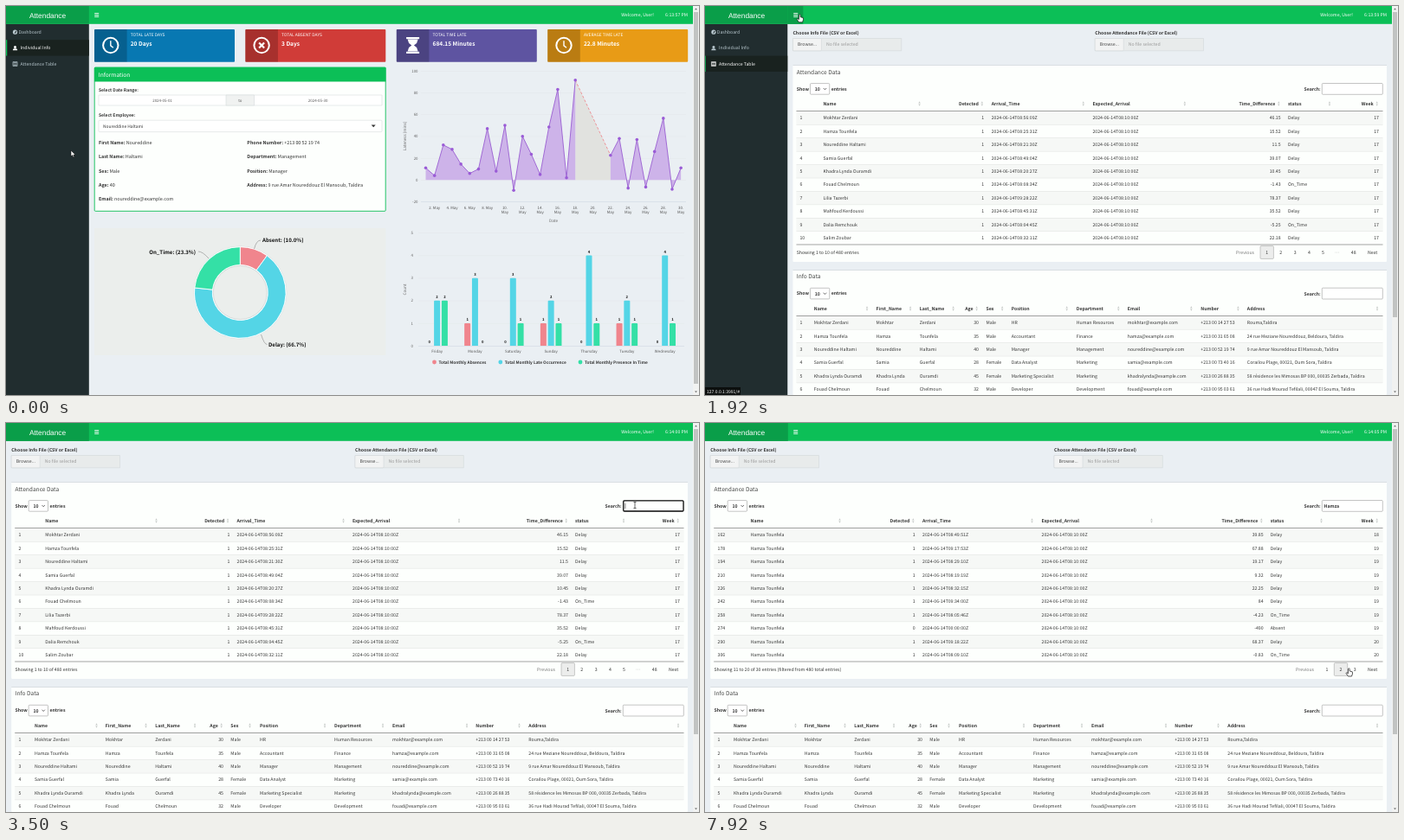
An HTML page with a canvas for the animation above (8000 ms loop, 800x450 px).

```html
<!DOCTYPE html>
<html lang="en">
<head>
<meta charset="utf-8">
<title>Attendance</title>
<style>
html, body { margin: 0; width: 100%; height: 100%; overflow: hidden; }
canvas { display: block; }
</style>
</head>
<body>
<canvas id="stage" width="800" height="450"></canvas>
<script>
const ctx = document.getElementById('stage').getContext('2d');
ctx.textRendering = 'geometricPrecision';
const SANS = '"Noto Sans CJK JP", "Noto Sans CJK SC", "Noto Sans CJK", Lato, sans-serif';
const LOOP = 8000, GREEN = '#0cbf57', DARK_GREEN = '#0a9e49', PAGE = '#eaeff3', PANEL = '#fdfffd';
const TICKS = [900, 1900, 2900, 3980, 4980, 5810, 6900, 7900];
const KEYS = [3670, 4580, 5580, 5660, 5760];
const QUERY = 'Hamza', FILTER_AT = 4750, PAGE2_AT = 7500;

// Drawing helpers; text is centred vertically on y
function text(s, x, y, color = '#333', size = 5.2, weight = 400, align = 'left', font = SANS) {
  ctx.font = `${weight} ${size}px ${font}`;
  ctx.textAlign = align;
  ctx.fillStyle = color;
  ctx.fillText(s, x, y + size * 0.365);
}
const bold = (s, x, y, color, size, align) => text(s, x, y, color, size, 700, align);
function rect(x, y, w, h, color) {
  ctx.fillStyle = color;
  ctx.fillRect(x, y, w, h);
}
function box(x, y, w, h, fill, stroke, r = 0, line = 0.5) {
  ctx.beginPath();
  ctx.roundRect(x, y, w, h, r);
  paint(fill, stroke, line);
}
function circle(x, y, r, fill, stroke, line) {
  ctx.beginPath();
  ctx.arc(x, y, r, 0, 7);
  paint(fill, stroke, line);
}
function poly(points, fill, stroke, line, close = true) {
  ctx.beginPath();
  points.forEach(p => ctx.lineTo(...p));
  if (close) ctx.closePath();
  paint(fill, stroke, line);
}
function paint(fill, stroke, line = 0.5) {
  if (fill) { ctx.fillStyle = fill; ctx.fill(); }
  if (stroke) { ctx.strokeStyle = stroke; ctx.lineWidth = line; ctx.stroke(); }
}
const lerp = (a, b, k) => a + (b - a) * k;
const ease = k => k * k * (3 - 2 * k);
const clamp = k => Math.max(0, Math.min(1, k));

// Data
const people = [
  ['Mokhtar', 'Zerdani', 30, 'Male', 'HR', 'Human Resources', '+213 00 14 27 53', 'Rouma,Taldira'],
  ['Hamza', 'Tounfela', 35, 'Male', 'Accountant', 'Finance', '+213 00 31 65 08', '24 rue Meziane Noureddouz, Beldoura, Taldira'],
  ['Noureddine', 'Haltami', 40, 'Male', 'Manager', 'Management', '+213 00 52 19 74', '9 rue Amar Noureddouz El Mansoub, Taldira'],
  ['Samia', 'Guerfal', 28, 'Female', 'Data Analyst', 'Marketing', '+213 00 73 40 16', 'Corailou Plage, 00021, Oum Sora, Taldira'],
  ['Khadra Lynda', 'Ouramdi', 45, 'Female', 'Marketing Specialist', 'Marketing', '+213 00 26 88 35', '58 résidence les Mimosas BP 000, 00035 Zerbada, Taldira'],
  ['Fouad', 'Chelmoun', 32, 'Male', 'Developer', 'Development', '+213 00 95 03 61', '36 rue Hadi Mourad Tefilali, 00047 El Souma, Taldira'],
];
const fullName = p => p[0] + ' ' + p[1];
const email = p => p[0].toLowerCase().replace(' ', '') + '@example.com';
const staff = [...people.map(fullName), 'Lilia Tazerbi', 'Mahfoud Kerdoussi', 'Dalia Remchouk', 'Salim Zoubar'];

function entry(id, name, time) {
  const [h, m, s] = time.split(':').map(Number);
  const late = +(h * 60 + m + s / 60 - 490).toFixed(2);
  const status = !h ? 'Absent' : late > 0 ? 'Delay' : 'On_Time';
  const week = 17 + Math.floor((Math.floor((id - 1) / 16) + 3) / 7);
  return [id, name, h ? 1 : 0, `2024-06-14T${time}Z`, '2024-06-14T08:10:00Z', late, status, week];
}
const everyone = '08:56:09 08:25:31 08:21:30 08:49:04 08:20:27 08:08:34 09:28:22 08:45:31 08:04:45 08:32:11'
  .split(' ').map((s, i) => entry(i + 1, staff[i], s));
const filtered = ('08:25:31 08:42:30 09:29:35 08:59:28 08:06:54 08:05:17 08:31:31 00:00:00 00:00:00 08:20:22 ' +
  '08:49:51 09:17:53 08:29:10 08:19:19 08:32:15 09:34:00 08:05:46 00:00:00 09:18:22 08:09:10')
  .split(' ').map((s, i) => entry(2 + 16 * i, staff[1], s));
const infoRows = people.map((p, i) =>
  [i + 1, fullName(p), p[0], p[1], p[2], p[3], p[4], p[5], email(p), p[6], p[7]]);

// Columns: title, x per layout (sidebar open, closed, filtered), sort icon x or 'r' for right-aligned
const mainCols = [
  ['', [110, 14.5, 14.5]],
  ['Name', [137, 45.3, 52.5], [248, 173.5, 155.5]],
  ['Detected', [322.5, 258.3, 242.6], 'r'],
  ['Arrival_Time', [331, 266.5, 251], [437, 389.5, 377.5]],
  ['Expected_Arrival', [447.7, 400, 388.5], [554, 523, 515.5]],
  ['Time_Difference', [664.7, 649, 644.6], 'r'],
  ['status', [673, 657, 652.7], [721, 713, 711.5]],
  ['Week', [778, 778, 778], 'r'],
];
const infoCols = [
  ['', [110, 14.5]],
  ['Name', [126.3, 33], [187.5, 104.5]],
  ['First_Name', [198, 114.8], [237.5, 161.5]],
  ['Last_Name', [248.2, 172.2], [287, 218]],
  ['Age', [316.3, 251], 'r'],
  ['Sex', [324.8, 259.3], [343.5, 281.5]],
  ['Position', [354, 293], [418, 368]],
  ['Department', [429, 379], [477.5, 435]],
  ['Email', [488, 446], [561.5, 532]],
  ['Number', [572.5, 542.3], [615.5, 592.5]],
  ['Address', [626, 603.3], [776, 776]],
];

function table(cols, rows, headY, firstY, left, place) {
  const step = 15.43;
  rows.forEach((row, i) => {
    const y = firstY + i * step;
    if (i % 2 == 0) rect(left, y, 782.5 - left, step, '#f6f8f6');
    if (i) rect(left, y, 782.5 - left, 0.5, '#dcdedc');
  });
  rect(left, firstY - 0.5, 782.5 - left, 0.6, '#666');
  if (rows.length == 10) rect(left, firstY + 10 * step - 0.2, 782.5 - left, 0.6, '#666');
  cols.forEach(([title, xs, icon], c) => {
    const x = place(xs), right = icon == 'r', align = right ? 'right' : 'left';
    bold(title, right ? x - 6.3 : x, headY, '#333', 5.2, align);
    if (icon) {
      const ix = right ? x - 2.3 : place(icon);
      poly([[ix - 1.2, headY - 0.6], [ix + 1.2, headY - 0.6], [ix, headY - 2.8]], '#c4c8c6');
      poly([[ix - 1.2, headY + 0.6], [ix + 1.2, headY + 0.6], [ix, headY + 2.8]], '#c4c8c6');
    }
    rows.forEach((row, i) => text(row[c], x, firstY + (i + 0.5) * step, '#333', 5.2, 400, align));
  });
}

function tableHead(title, x, y) {
  text(title, x + 4.3, y + 8, '#444', 6.6);
  bold('Show', x + 4.3, y + 27.5);
  box(x + 20, y + 21.3, 22.3, 12.6, '#fff', '#888', 1);
  bold('10', x + 25.2, y + 27.7);
  poly([[x + 35.3, y + 26.7], [x + 37, y + 28.5], [x + 38.7, y + 26.7]], null, '#333', 0.7, false);
  bold('entries', x + 44.3, y + 27.5);
  bold('Search:', 710.7, y + 27.7, '#333', 5.2, 'right');
  box(712.3, y + 21.2, 70, 12.8, '#fff', '#888', 1);
}

function fileInput(label, x) {
  bold(label, x, 31.3);
  box(x, 37.5, 125.3, 14.3, '#e8ebeb', '#cdd2d5');
  box(x, 37.5, 33, 14.3, '#f2f3f3', '#cdd2d5', 1);
  text('Browse...', x + 5.5, 44.6, '#444');
  text('No file selected', x + 38.5, 44.6, '#999');
}

function pager(labels, current) {
  for (const [s, x] of labels) {
    if (s == current) box(x - 7.7, 277.6, 15.4, 14.8, '#ecedec', '#999', 1);
    text(s, x, 285.2, s == 'Previous' || s == '…' ? '#777' : '#333', 5.2, 400, 'center');
  }
}

function tablePage(t, p) {
  const x = lerp(102, 6.2, p), isFiltered = t >= FILTER_AT, second = t >= PAGE2_AT;
  const slide = xs => lerp(xs[0], xs[1], p);
  fileInput('Choose Info File (CSV or Excel)', x);
  fileInput('Choose Attendance File (CSV or Excel)', lerp(450.5, 403, p));
  for (const [y, h] of [[68, 228], [305, 145]]) {
    box(x, y, 787 - x, h, PANEL, null, 1);
    rect(x, y, 787 - x, 1, '#d9dee2');
  }
  tableHead('Attendance Data', x, 68.3);
  const focus = t >= 3500 && !second;
  if (focus) box(712.8, 89.8, 69.2, 12.2, '#fff', '#111', 1.2, 1.3);
  const typed = QUERY.slice(0, KEYS.filter(k => t >= k).length);
  bold(typed, 714.5, 96);
  if (focus && t < 4000) rect(714.7 + ctx.measureText(typed).width, 93, 0.5, 6, '#111');
  const rows = isFiltered ? filtered.slice(second ? 10 : 0, second ? 20 : 10) : everyone;
  table(mainCols, rows, 113, 121.6, x + 4, isFiltered ? xs => xs[2] : slide);
  text(isFiltered ? `Showing ${second ? '11 to 20' : '1 to 10'} of 30 entries (filtered from 480 total entries)`
    : 'Showing 1 to 10 of 480 entries', x + 4.3, 285);
  pager(isFiltered
    ? [['Previous', 692.5], ['1', 718], ['2', 734], ['3', 750.3], ['Next', 770.6]]
    : [['Previous', 623.5], ['1', 648.7], ['2', 664.8], ['3', 681.2], ['4', 697.4], ['5', 713.5], ['…', 729.7], ['48', 748.7], ['Next', 770.6]],
    second ? '2' : '1');
  tableHead('Info Data', x, 305);
  table(infoCols, infoRows, 350, 358.5, x + 4, slide);
}

// Individual info page
function clockIcon(x, y) {
  circle(x, y, 8.7, null, '#fff', 2);
  poly([[x, y - 5.2], [x, y + 0.3], [x + 3, y + 2.8]], null, '#fff', 1.4, false);
}
function crossIcon(x, y) {
  circle(x, y, 8.7, null, '#fff', 2);
  poly([[x - 3, y - 3], [x + 3, y + 3]], null, '#fff', 2.2);
  poly([[x - 3, y + 3], [x + 3, y - 3]], null, '#fff', 2.2);
}
function hourglassIcon(x, y) {
  rect(x - 7.5, y - 9.5, 15, 2.2, '#fff');
  rect(x - 7.5, y + 7.3, 15, 2.2, '#fff');
  poly([[x - 6, y - 7], [x + 6, y - 7], [x + 4.5, y - 2.5], [x + 1.3, y], [x + 4.5, y + 2.5], [x + 6, y + 7],
    [x - 6, y + 7], [x - 4.5, y + 2.5], [x - 1.3, y], [x - 4.5, y - 2.5]], '#fff');
}
const cards = [
  [102, '#0878b2', 'TOTAL LATE DAYS', '20 Days', clockIcon],
  [276.3, '#d03c38', 'TOTAL ABSENT DAYS', '3 Days', crossIcon],
  [450.8, '#5e54a1', 'TOTAL TIME LATE', '684.15 Minutes', hourglassIcon],
  [625.2, '#e89b16', 'AVERAGE TIME LATE', '22.8 Minutes', clockIcon],
];

function infoPanel() {
  const p = people[2];
  box(102.2, 71, 336, 166.3, PANEL, GREEN, 1, 0.9);
  rect(102, 71, 336.4, 16.5, GREEN);
  text('Information', 106.7, 79.3, '#fff', 6.6);
  bold('Select Date Range:', 107, 96.7, '#333', 5);
  box(107, 103, 327, 12, '#fff', '#cfd4d6');
  box(254, 103, 32.5, 12, '#f0f2f1', '#cfd4d6');
  ['2024-05-01', 'to', '2024-05-30'].forEach((s, i) => text(s, 180.5 + 89.8 * i, 109.2, '#555', 4.4, 400, 'center'));
  bold('Select Employee:', 107, 125.7, '#333', 5);
  box(107, 132.2, 327, 13.4, '#fff', '#cfd4d6', 1);
  text(fullName(p), 112, 139, '#333', 4.9);
  poly([[421.7, 137.6], [426.7, 137.6], [424.2, 140.2]], '#333');
  const fields = [['First Name:', p[0]], ['Last Name:', p[1]], ['Sex:', p[3]], ['Age:', p[2]], ['Email:', email(p)],
    ['Phone Number:', p[6]], ['Department:', p[5]], ['Position:', p[4]], ['Address:', p[7]]];
  fields.forEach(([label, value], i) => {
    const x = i < 5 ? 107 : 278.3, y = 158.3 + (i % 5) * 16.15;
    bold(label, x, y, '#333', 5.4);
    text(value, x + ctx.measureText(label + ' ').width, y, '#333', 5.4);
  });
}

const lateness = [11, 4, 32, 28, 14.5, 6, 10, 47, 8, 50, -9.5, 40, 23.5, 5, 48.5, 83, 2, 91.5,
  null, null, null, 22.5, 38, -7.5, 37, -6.5, 26, 56.5, -8.5, 11];
function areaChart() {
  const X = i => 484.5 + i * 10.16, Y = v => 201.2 - v * 1.262;
  for (let v = -20; v <= 100; v += 20) {
    rect(479, Y(v), 306, 0.5, v + 20 ? '#e1e5e8' : '#c9d2de');
    text(v, 475.5, Y(v), '#666', 4.4, 400, 'right');
  }
  const points = lateness.map((v, i) => [X(i), Y(v)]);
  const gap = [points[17], points[21]];
  poly([...gap, [gap[1][0], Y(0)], [gap[0][0], Y(0)]], '#e1e2df');
  ctx.setLineDash([3, 2]);
  poly(gap, null, '#ef7f86', 0.8, false);
  ctx.setLineDash([]);
  for (const run of [points.slice(0, 18), points.slice(21)]) {
    poly([[run[0][0], Y(0)], ...run, [run.at(-1)[0], Y(0)]], '#cdb3e9');
    poly(run, null, '#9a5fd2', 0.9, false);
    run.forEach(q => circle(...q, 1.8, '#9a5bd6'));
  }
  for (let d = 2; d <= 30; d += 2) {
    const lines = d < 10 ? [d + '. May'] : [d + '.', 'May'];
    lines.forEach((s, i) => text(s, X(d - 1), 233 + i * 5.6, '#555', 4.4, 400, 'center'));
  }
  text('Date', 632, 248, '#666', 4.6, 400, 'center');
  sideTitle('Lateness (mins)', 460.5, 150.5);
}
function sideTitle(s, x, y) {
  ctx.save();
  ctx.translate(x, y);
  ctx.rotate(-Math.PI / 2);
  text(s, 0, 0, '#666', 4.6, 400, 'center');
  ctx.restore();
}

const PINK = '#f0858d', CYAN = '#54d5e6', MINT = '#34e0a6';
function donut() {
  const cx = 270.3, cy = 331.5;
  rect(102, 257, 336.3, 147, '#ebeeec');
  circle(cx, cy, 53.6, '#fff', '#ccd2d2', 0.5);
  let a = -Math.PI / 2;
  for (const [share, color] of [[0.1, PINK], [2 / 3, CYAN], [0.2333, MINT]]) {
    const b = a + share * Math.PI * 2;
    ctx.beginPath();
    ctx.arc(cx, cy, 52.8, a, b);
    ctx.arc(cx, cy, 32, b, a, true);
    ctx.closePath();
    paint(color, '#fff', 0.9);
    a = b;
  }
  circle(cx, cy, 31, '#ebeeec', '#c3c8c8', 0.6);
  for (const [x1, y1, x2, y2, x3, y3] of [[294, 271, 289, 271, 286.5, 281], [222, 284, 227, 284, 234, 292], [301.5, 391.5, 298, 391.5, 294.5, 380]]) {
    ctx.beginPath();
    ctx.moveTo(x1, y1);
    ctx.quadraticCurveTo(x2, y2, x3, y3);
    paint(null, '#777', 0.5);
  }
  bold('Absent: (10.0%)', 296, 271, '#111', 6.1);
  bold('On_Time: (23.3%)', 219, 284.3, '#111', 6.1, 'right');
  bold('Delay: (66.7%)', 303, 392, '#111', 6.1);
}

const week = { Friday: [0, 2, 2], Monday: [1, 3, 0], Saturday: [0, 3, 1], Sunday: [1, 2, 1], Thursday: [0, 4, 1], Tuesday: [1, 2, 1], Wednesday: [0, 4, 1] };
function barChart() {
  const Y = v => 393 - v * 26.1;
  for (let v = 0; v <= 5; v++) {
    rect(476, Y(v), 307, 0.5, v ? '#e1e5e8' : '#c9d2de');
    text(v, 470, Y(v), '#666', 4.4, 400, 'right');
  }
  Object.entries(week).forEach(([day, counts], d) => {
    const x = 497.6 + d * 43.85;
    text(day, x, 399, '#555', 4.4, 400, 'center');
    counts.forEach((n, i) => {
      const bx = x + (i - 1) * 8.8;
      box(bx - 3.5, Y(n), 7, n * 26.1, [PINK, CYAN, MINT][i], null, n ? [1, 1, 0, 0] : 0);
      bold(n, bx, Y(n) - 4.6, '#111', 4.2, 'center');
    });
  });
  sideTitle('Count', 460.5, 328);
  [[494.5, PINK, 'Total Monthly Absences'], [570.8, CYAN, 'Total Monthly Late Occurrence'], [663, MINT, 'Total Monthly Presence In Time']]
    .forEach(([x, color, s]) => {
      circle(x, 412, 2.4, color);
      bold(s, x + 5, 412, '#333', 4.75);
    });
}

function infoPage() {
  for (const [x, color, label, value, icon] of cards) {
    box(x, 27, 162, 37.7, color, null, 1);
    rect(x, 27, 37.6, 37.7, 'rgba(0,0,0,.2)');
    icon(x + 18.8, 45.5);
    text(label, x + 41.7, 33.6, '#fff', 4.9);
    bold(value, x + 41.7, 43.2, '#fff', 6.6);
  }
  infoPanel();
  areaChart();
  donut();
  barChart();
}

// Frame around the pages
function sidebar(x, active) {
  rect(x, 21, 95.8, 429, '#212d2f');
  rect(x, 39.2 + active * 18.4 - 18.4, 95.8, 18.4, '#19221f');
  rect(x, 39.2 + active * 18.4 - 18.4, 1.3, 18.4, GREEN);
  ['Dashboard', 'Individual Info', 'Attendance Table'].forEach((s, i) => {
    const y = 30.2 + i * 18.4, on = i == active, color = on ? '#fff' : '#b8c7ce';
    text(s, x + (i ? 16.6 : 14.4), y, color, 5.2, on ? 500 : 400);
    const ix = x + 10.5;
    if (i == 0) {
      circle(ix, y, 2.6, color);
      poly([[ix, y + 1.2], [ix + 1.2, y - 1.3]], null, '#212d2f', 0.8);
    } else if (i == 1) {
      circle(ix, y - 1.2, 1.5, color);
      box(ix - 2.6, y + 0.6, 5.2, 2, color, null, [1.5, 1.5, 0, 0]);
    } else {
      box(ix - 2.5, y - 2.4, 5, 4.9, null, color, 0, 0.7);
      for (let k = -1; k < 2; k++) rect(ix - 2, y + k * 1.4 - 0.3, 4, 0.7, color);
    }
  });
}

function header(t) {
  rect(0, 0, 793, 20.8, GREEN);
  rect(0, 0, 95.8, 20.8, DARK_GREEN);
  if (t > 1600 && t < 2300) rect(95.8, 0, 17.5, 20.8, DARK_GREEN);
  text('Attendance', 48, 10.5, '#fff', 8.33, 400, 'center', '"Liberation Sans", Arial, sans-serif');
  for (let i = 0; i < 3; i++) rect(102.2, 8.1 + i * 1.9, 5, 0.9, '#fff');
  text('Welcome, User!', 710.3, 10.5, '#fff');
  const s = 57 + TICKS.filter(k => t >= k).length;
  text(`6:${13 + Math.floor(s / 60)}:${String(s % 60).padStart(2, '0')} PM`, 787, 10.5, '#fff', 5.2, 400, 'right');
}

function scrollbar(thumb) {
  rect(793, 0, 7, 450, '#f1f2f1');
  rect(794, 7, 5, thumb, '#c1c3c2');
  poly([[795, 4.3], [798, 4.3], [796.5, 2.5]], '#666');
  poly([[795, 445.5], [798, 445.5], [796.5, 447.3]], '#666');
}

function statusBar(s, w) {
  rect(0, 441, w, 9, '#0c0f0e');
  text(s, 2, 445.7, '#fff', 5);
}

// Pointer: time, x, y of the hot spot
const path = [[0, 75, 167], [80, 75, 167], [420, 41, 70], [920, 41, 70], [1670, 109.3, 9.8], [2000, 109.3, 9.8],
  [2250, 373, 58.5], [3250, 726, 95], [3670, 726, 95], [4000, 723, 99], [6000, 723, 99], [6420, 730, 180],
  [6580, 730, 180], [7330, 735, 284], [7580, 735, 284], [7900, 743.3, 284], [LOOP, 743.3, 284]];
function pointer(t) {
  const i = path.findIndex(k => k[0] > t), [t0, x0, y0] = path[i - 1], [t1, x1, y1] = path[i];
  const k = ease((t - t0) / (t1 - t0)), x = lerp(x0, x1, k), y = lerp(y0, y1, k);
  ctx.save();
  ctx.translate(x, y);
  const inField = x > 712 && x < 782 && y > 89 && y < 103;
  const onLink = x < 96 && y < 76 || x < 114 && y < 21 || x > 710 && y > 277;
  if (inField) {
    for (const dy of [-3.4, 3.4]) rect(-1.5, dy - 0.3, 3, 0.7, '#222');
    rect(-0.35, -3.4, 0.7, 6.8, '#222');
  } else if (onLink) {
    poly([[-0.8, 0.3], [0, -0.2], [0.8, 0.3], [0.9, 3], [4, 3.8], [4.2, 6], [3.2, 9], [-1, 9], [-3.2, 5.5], [-2.6, 4.7], [-0.9, 5.8]], '#fff', '#111', 0.7);
  } else {
    poly([[0, 0], [0, 7], [1.6, 5.6], [2.7, 8], [3.8, 7.5], [2.8, 5.2], [5, 5.1]], '#fff', '#111', 0.6);
  }
  ctx.restore();
}

function draw() {
  const t = performance.now() % LOOP, onTable = t >= 500;
  const closed = ease(clamp((t - 1905) / 360));
  rect(0, 0, 800, 450, PAGE);
  onTable ? tablePage(t, closed) : infoPage();
  sidebar(-95.8 * closed, onTable ? 2 : 1);
  header(t);
  scrollbar(onTable ? 353 : 430);
  if (t > 400 && t < 1100) statusBar('127.0.0.1:3991/#shiny-tab-table', 75);
  if (t > 1650 && t < 2600) statusBar('127.0.0.1:3991/#', 41);
  pointer(t);
  requestAnimationFrame(draw);
}
draw();
</script>
</body>
</html>
```
